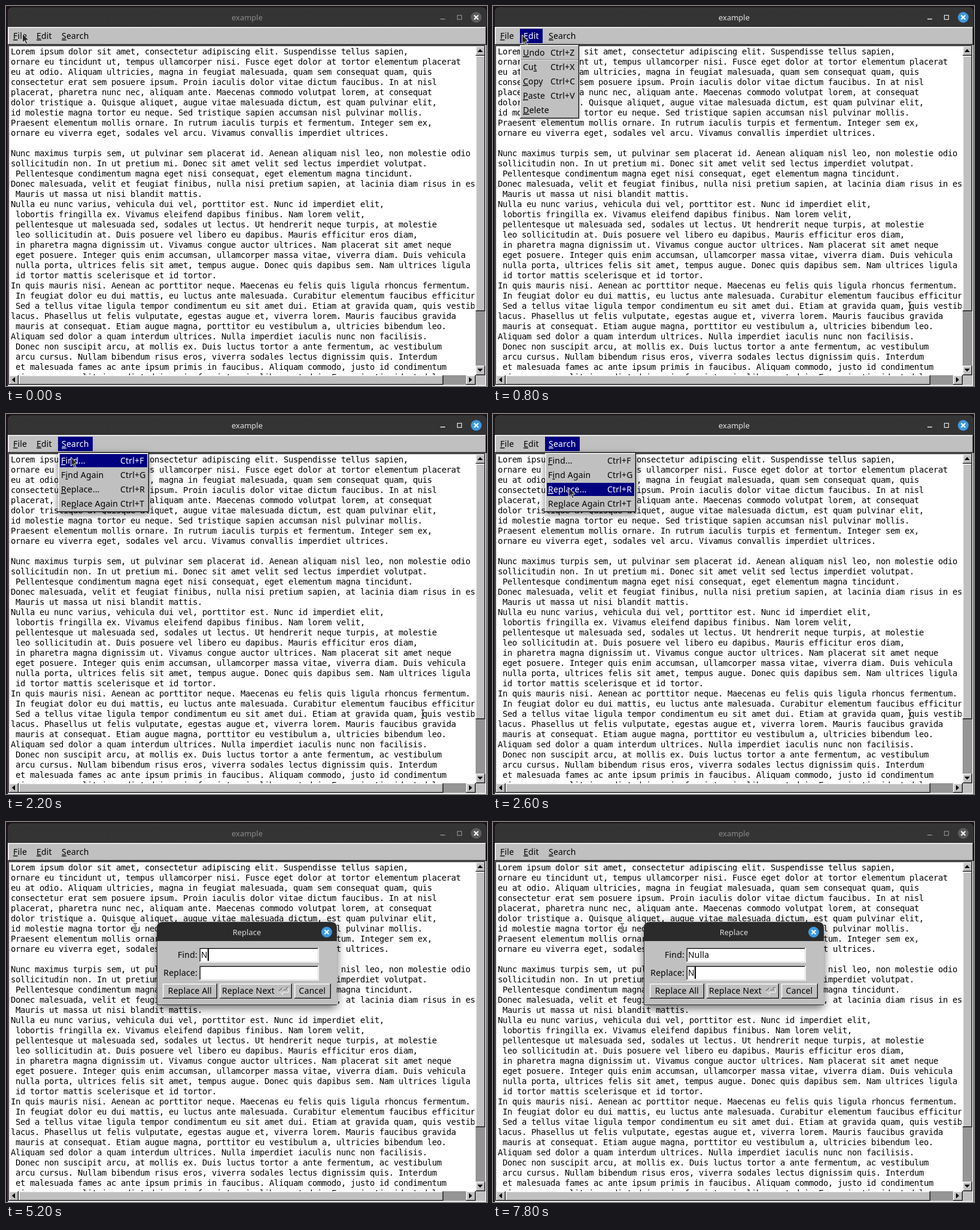
An HTML page for the animation above (8000 ms loop, 804 by 635 pixels).

```html
<!DOCTYPE html>
<html lang="en">
<head>
<meta charset="utf-8">
<title>example</title>
<style>
html, body { margin: 0; width: 100%; height: 100%; overflow: hidden; background: #1b1315; }
svg { display: block; width: 804px; height: 635px; }
text { font: 14px "Noto Sans", "Open Sans", sans-serif; letter-spacing: .2px; white-space: pre; }
/* Fixed 8 px character cells. */
pre {
  margin: 1px 3px;
  font: 14px/17px "DejaVu Sans Mono", "Liberation Mono", monospace;
  letter-spacing: calc(8px - 1ch);
  color: #000;
}
.title { font-size: 13px; letter-spacing: 0; text-anchor: middle; }
.end { text-anchor: end; }
.mid { text-anchor: middle; }
.key { text-decoration: underline; text-decoration-skip-ink: none; }
.pop { filter: drop-shadow(0 3px 6px rgba(0, 0, 0, .55)); }
.dialog { filter: drop-shadow(0 5px 8px rgba(0, 0, 0, .6)); }

/* Every animation holds its value until the next key: 1% is 80 ms. */
.t { animation: 8s step-end infinite; }
.on { animation-name: on; }
.off { animation-name: off; }
.file { animation-name: file; }
.edit { animation-name: edit; }
.search { animation-name: search; }
.edit-pop { animation-name: edit-pop; }
.search-pop { animation-name: search-pop; }
.ghost { animation-name: ghost; }
.row0 { animation-name: row0; }
.row1 { animation-name: row1; }
.row2 { animation-name: row2; }
.arrow { animation-name: arrow; }
.beam { animation-name: beam; }
.late { animation-name: late; }
.type1 { animation-name: type1; }
.type2 { animation-name: type2; }
.caret1 { animation-name: caret1; }
.caret2 { animation-name: caret2; }

@keyframes on { 0% { opacity: 0 } 3.75% { opacity: 1 } 37.5%, 100% { opacity: 0 } }
@keyframes off { 0% { opacity: 1 } 3.75% { opacity: 0 } 37.5%, 100% { opacity: 1 } }
@keyframes file { 0% { opacity: 0 } 3.75% { opacity: 1 } 10%, 100% { opacity: 0 } }
@keyframes edit { 0% { opacity: 0 } 10% { opacity: 1 } 17.5%, 100% { opacity: 0 } }
@keyframes search {
  0% { opacity: 0 } 17.5% { opacity: 1 } 22.5% { opacity: 0 }
  23.75% { opacity: 1 } 37.5%, 100% { opacity: 0 }
}
@keyframes edit-pop {
  0% { filter: drop-shadow(0 2px 5px rgba(0, 0, 0, .25)) }
  11.25%, 100% { filter: drop-shadow(0 3px 6px rgba(0, 0, 0, .55)) }
}
@keyframes search-pop {
  0% { filter: drop-shadow(0 2px 5px rgba(0, 0, 0, .25)) }
  18.75%, 100% { filter: drop-shadow(0 3px 6px rgba(0, 0, 0, .55)) }
}
@keyframes ghost { 0% { opacity: 0 } 22.5% { opacity: 1 } 23.75%, 100% { opacity: 0 } }
@keyframes row0 { 0% { opacity: 0 } 27.5% { opacity: 1 } 30%, 100% { opacity: 0 } }
@keyframes row1 { 0% { opacity: 0 } 30% { opacity: 1 } 32.5%, 100% { opacity: 0 } }
@keyframes row2 { 0% { opacity: 0 } 32.5% { opacity: 1 } 37.5%, 100% { opacity: 0 } }
@keyframes arrow {
  0% { transform: translate(27px, 46px); opacity: 1 }
  10% { transform: translate(48px, 48px) }
  17.5% { transform: translate(89px, 48px) }
  18.75% { transform: translate(96px, 49px) }
  20% { transform: translate(100px, 49px) }
  26.25% { transform: translate(103px, 58px) }
  27.5% { transform: translate(108px, 72px) }
  28.75% { transform: translate(113px, 86px) }
  30% { transform: translate(118px, 99px) }
  31.25% { transform: translate(122px, 112px) }
  32.5% { transform: translate(126px, 123px); opacity: 1 }
  37.5%, 100% { transform: translate(126px, 123px); opacity: 0 }
}
@keyframes beam {
  0% { transform: translate(126px, 124px) }
  42.5% { transform: translate(150px, 138px) }
  43.75% { transform: translate(190px, 163px) }
  45%, 100% { transform: translate(216px, 177px) }
}
@keyframes late { 0% { opacity: 0 } 37.5%, 100% { opacity: 1 } }
@keyframes type1 {
  0% { transform: none }
  65% { transform: translateX(11px) }
  68.75% { transform: translateX(20px) }
  71.25% { transform: translateX(24px) }
  72.5% { transform: translateX(28px) }
  78.75%, 100% { transform: translateX(36px) }
}
@keyframes type2 { 0% { transform: none } 97.5%, 100% { transform: translateX(11px) } }
@keyframes caret1 { 0% { opacity: 1 } 83.75%, 100% { opacity: 0 } }
@keyframes caret2 { 0% { opacity: 0 } 83.75%, 100% { opacity: 1 } }
</style>
</head>
<body>
<svg id="stage" viewBox="0 0 804 635"></svg>
<script>
const copy = `Lorem ipsum dolor sit amet, consectetur adipiscing elit. Suspendisse tellus sapien,
ornare eu tincidunt ut, tempus ullamcorper nisi. Fusce eget dolor at tortor elementum placerat
eu at odio. Aliquam ultricies, magna in feugiat malesuada, quam sem consequat quam, quis
consectetur erat sem posuere ipsum. Proin iaculis dolor vitae dictum faucibus. In at nisl
placerat, pharetra nunc nec, aliquam ante. Maecenas commodo volutpat lorem, at consequat
dolor tristique a. Quisque aliquet, augue vitae malesuada dictum, est quam pulvinar elit,
id molestie magna tortor eu neque. Sed tristique sapien accumsan nisl pulvinar mollis.
Praesent elementum mollis ornare. In rutrum iaculis turpis et fermentum. Integer sem ex,
ornare eu viverra eget, sodales vel arcu. Vivamus convallis imperdiet ultrices.

Nunc maximus turpis sem, ut pulvinar sem placerat id. Aenean aliquam nisl leo, non molestie odio
sollicitudin non. In ut pretium mi. Donec sit amet velit sed lectus imperdiet volutpat.
 Pellentesque condimentum magna eget nisi consequat, eget elementum magna tincidunt.
Donec malesuada, velit et feugiat finibus, nulla nisi pretium sapien, at lacinia diam risus in est
 Mauris ut massa ut nisi blandit mattis.
Nulla eu nunc varius, vehicula dui vel, porttitor est. Nunc id imperdiet elit,
 lobortis fringilla ex. Vivamus eleifend dapibus finibus. Nam lorem velit,
 pellentesque ut malesuada sed, sodales ut lectus. Ut hendrerit neque turpis, at molestie
 leo sollicitudin at. Duis posuere vel libero eu dapibus. Mauris efficitur eros diam,
 in pharetra magna dignissim ut. Vivamus congue auctor ultrices. Nam placerat sit amet neque
 eget posuere. Integer quis enim accumsan, ullamcorper massa vitae, viverra diam. Duis vehicula
 nulla porta, ultrices felis sit amet, tempus augue. Donec quis dapibus sem. Nam ultrices ligula
 id tortor mattis scelerisque et id tortor.
In quis mauris nisi. Aenean ac porttitor neque. Maecenas eu felis quis ligula rhoncus fermentum.
 In feugiat dolor eu dui mattis, eu luctus ante malesuada. Curabitur elementum faucibus efficitur.
 Sed a tellus vitae ligula tempor condimentum eu sit amet dui. Etiam at gravida quam, quis vestibulum
lacus. Phasellus ut felis vulputate, egestas augue et, viverra lorem. Mauris faucibus gravida
 mauris at consequat. Etiam augue magna, porttitor eu vestibulum a, ultricies bibendum leo.
Aliquam sed dolor a quam interdum ultrices. Nulla imperdiet iaculis nunc non facilisis.
 Donec non suscipit arcu, at mollis ex. Duis luctus tortor a ante fermentum, ac vestibulum
 arcu cursus. Nullam bibendum risus eros, viverra sodales lectus dignissim quis. Interdum
 et malesuada fames ac ante ipsum primis in faucibus. Aliquam commodo, justo id condimentum
 vivamus, ex velit imperdiet dui, quis feugiat enim libero ut dui. Fusce in tincidunt dolor.`;

const GRAY = '#c0c0c0', NAVY = '#000080', BLUE = '#3c9ae4';
const UP = ['#000', '#fff', '#909090', '#dadada'];
const DOWN = ['#fff', '#909090', '#dadada', '#000'];
const BEAM = 'M-3-7.5h2.5l.5.5.5-.5H3M0-7V7M-3 7.5h2.5L0 7l.5.5H3';

const rect = (x, y, w, h, fill, more = '') =>
  `<rect x="${x}" y="${y}" width="${w}" height="${h}" fill="${fill}" ${more}/>`;
const path = (d, more = '') => `<path d="${d}" ${more}/>`;
const line = (d, color, more = '') => path(d, `fill="none" stroke="${color}" ${more}`);
const group = (cls, ...parts) => `<g class="${cls}">${parts.join('')}</g>`;
// "&" marks the underlined letter.
const label = (x, y, s, cls = '', fill = '#000') =>
  `<text x="${x}" y="${y}" class="${cls}" fill="${fill}">` +
  s.replace(/&(.)/, '<tspan class="key">$1</tspan>') + '</text>';
const bevel = (x, y, w, h, [br, tl, br2, tl2] = UP, fill = GRAY) =>
  rect(x, y, w, h, br) + rect(x, y, w - 1, h - 1, tl) +
  rect(x + 1, y + 1, w - 2, h - 2, br2) + rect(x + 1, y + 1, w - 3, h - 3, tl2) +
  rect(x + 2, y + 2, w - 4, h - 4, fill);

const closer = (x, y, disc) =>
  `<circle cx="${x}" cy="${y}" r="9" fill="${disc}"/>` +
  line(`M${x - 3.5} ${y - 3.5}l7 7m0-7l-7 7`, '#fff', 'stroke-width="2"');

const titleBar = (cls, ink, disc) => group('t ' + cls,
  label(403, 24, 'example', 'title', ink),
  rect(726, 21, 8, 1.5, ink),
  rect(754.5, 15.5, 7, 7, 'none', `stroke="${ink}" stroke-width="1.2"`),
  closer(786, 19, disc));

const scrollBars = () =>
  rect(785, 67, 16, 550, '#959595') + rect(5, 617, 780, 16, '#959595') +
  rect(785, 617, 16, 16, GRAY) +
  bevel(785, 67, 16, 16) + bevel(785, 83, 16, 427) + bevel(785, 601, 16, 16) +
  bevel(5, 617, 16, 16) + bevel(21, 617, 710, 16) + bevel(769, 617, 16, 16) +
  path('M788 77h9l-4.5-5zM788 606h9l-4.5 5zM15 620v9l-5-4.5zM774 620v9l5-4.5z');

const row = (x, keyX, i, [name, key = ''], fill) =>
  label(x, 83 + 24 * i, name, '', fill) + label(keyX, 83 + 24 * i, key, '', fill);

function menu(cls, title, x, titleW, w, keyX, items, lines = [], hot = 0) {
  const body = bevel(x, 65, w, 24 * items.length + 3) +
    lines.map(i => rect(x + 2, 89 + 24 * i, w - 4, 1, '#808080') +
      rect(x + 2, 90 + 24 * i, w - 4, 1, '#eee')).join('') +
    items.map((it, i) => row(x + 5, keyX, i, it)).join('') +
    items.slice(0, hot).map((it, i) => group(`t row${i}`,
      rect(x + 3, 67 + 24 * i, w - 6, 22, NAVY), row(x + 5, keyX, i, it, '#fff'))).join('');
  return group('t ' + cls,
    rect(x, 38, titleW, 24, NAVY), label(x + 6, 55, title, '', '#fff'),
    group(`pop t ${cls}-pop`, body));
}

// White cover hides the letters not typed yet and travels with the caret.
const field = (y, n, text) =>
  bevel(323, y, 200, 25, DOWN, '#fff') + label(326, y + 17, text) +
  group('t type' + n, rect(326, y + 2, 60, 20, '#fff'),
    rect(326, y + 2, 2, 20, '#000', `class="t caret${n}"`));

const dialog = () => group('t late',
  group('dialog',
    path('M252 306V177q0-10 10-10h281q10 0 10 10V306z', 'fill="#2b2b2b"'),
    rect(253, 199, 300, 106, GRAY)),
  label(402.5, 189, 'Replace', 'title', '#dcdcdc'),
  closer(536, 184, BLUE),
  label(320, 227, 'Find:', 'end'), label(320, 257, 'Replace:', 'end'),
  field(210, 1, 'Nulla'), field(240, 2, 'N'),
  bevel(262, 270, 91, 25), label(307.5, 287, 'Replace All', 'mid'),
  bevel(357, 270, 121, 25), label(361, 287, 'Replace Next'),
  line('M456 282.5l6.5 6v-4h10v-8M462.5 280v-4', '#f4f4f4'),
  line('M456 282.5l6.5-6', '#333'),
  line('M463 280.5h5.5v-4h4', '#707070'),
  bevel(482, 270, 61, 25), label(512, 287, 'Cancel', 'mid'));

document.getElementById('stage').innerHTML = `
  <defs>
    <linearGradient id="bar" x2="0" y2="1"><stop stop-color="#343434"/><stop offset="1" stop-color="#2a2a2a"/></linearGradient>
    <filter id="soft"><feGaussianBlur stdDeviation="2"/></filter>
  </defs>` + [
  path('M3 635V10q0-8 8-8H795q8 0 8 8V635z', 'fill="url(#bar)"'),
  titleBar('off', '#8a8a8a', '#5c5c5c'),
  titleBar('on', '#e4e4e4', BLUE),
  bevel(3, 35, 800, 30),
  label(12, 55, '&File'), label(51, 55, '&Edit'), label(93, 55, '&Search'),
  bevel(3, 65, 800, 570, DOWN, '#fff'),
  `<foreignObject x="5" y="67" width="778" height="550"><pre>${copy}</pre></foreignObject>`,
  scrollBars(),
  group('t on', line('M694 494.5h5m-2.5 0v14m-2.5 0h5', '#000')),
  group('t ghost',
    path('M88 148h4v8h144v8H88z', 'opacity=".3" filter="url(#soft)"'),
    rect(91, 161, 146, 3, '#444', 'opacity=".7" rx="1.5"')),
  menu('file', '&File', 6, 35, 187, 104, [
    ['&New File'], ['&Open File...', 'Ctrl+O'], ['&Insert File...', 'Ctrl+I'],
    ['&Save File', 'Ctrl+S'], ['Save File &As...', 'Ctrl+Shift+S'],
    ['New &View', 'Alt+V'], ['&Close View', 'Ctrl+W'], ['E&xit', 'Ctrl+Q']], [2, 4, 6]),
  menu('edit', '&Edit', 45, 38, 99, 96, [
    ['&Undo', 'Ctrl+Z'], ['Cu&t', 'Ctrl+X'], ['&Copy', 'Ctrl+C'],
    ['&Paste', 'Ctrl+V'], ['&Delete']], [0]),
  menu('search', '&Search', 87, 58, 152, 191, [
    ['&Find...', 'Ctrl+F'], ['F&ind Again', 'Ctrl+G'],
    ['&Replace...', 'Ctrl+R'], ['Re&place Again', 'Ctrl+T']], [], 3),
  dialog(),
  group('t arrow', path('M.5 0V15l3.5-3.2 2.8 6 2.4-1.1-2.8-5.7h4.8z',
    'fill="#2a2a2a" stroke="#e8e8e8"')),
  group('t late', group('t beam',
    line(BEAM, '#fff', 'stroke-width="3" opacity=".8"'), line(BEAM, '#222')))
].join('');
</script>
</body>
</html>
```
